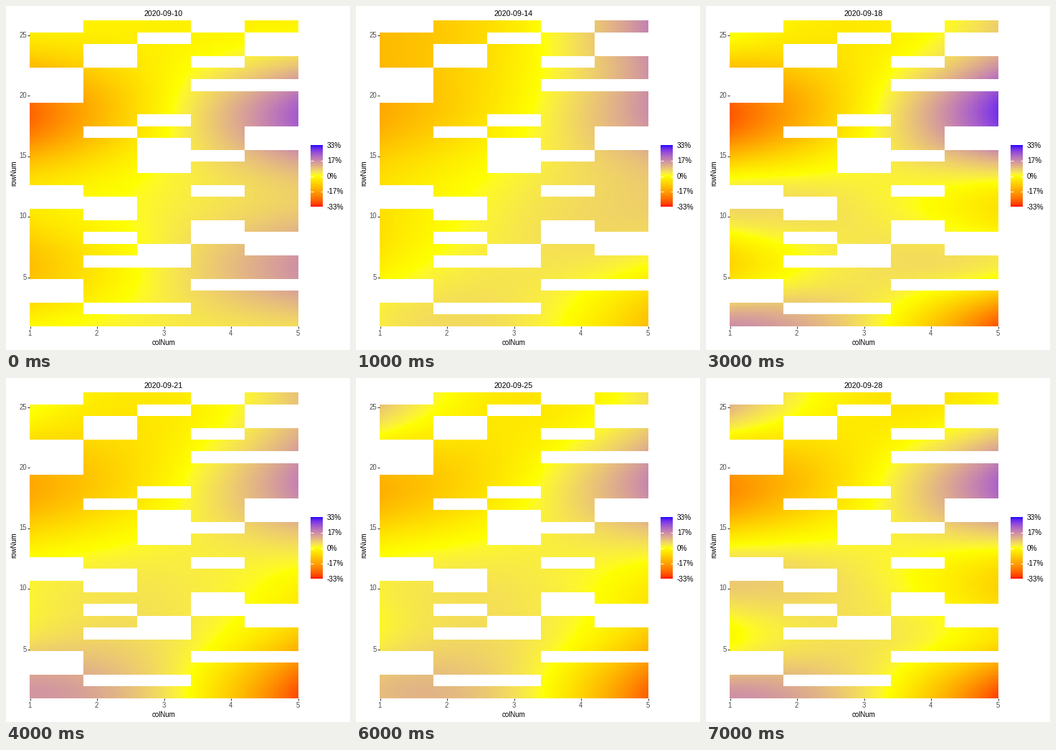
These frames come from a looping animation (480 px wide and 480 px high, 8000 ms). A matplotlib script:

```python
import numpy as np
import matplotlib
import matplotlib.pyplot as plt
from matplotlib.animation import FuncAnimation

matplotlib.rcParams["font.family"] = "Liberation Sans"

SIZE, DPI = 480, 72
LEFT, RIGHT, TOP, BOTTOM = 33, 407.6, 20.35, 446.52
ROWS, COLS = 26, 5
TILES_X, TILES_Y = 20, 5  # tiles per cell
LIMIT = 33

# Left-to-right tilt at these heights, then how strongly the sides bend.
HEIGHTS = np.array([1, 5.5, 10, 18.5, 26])
SHAPES = {
    "09-10": (3, 13.5, 6.5, 24.5, 0, 0.05),
    "09-14": (-7, 0.5, 6, 15.5, 14.5, 0.6),
    "09-18": (-22, 4, -4.5, 28, 2, 0.75),
    "09-21": (-22, -8.5, -2, 16.5, 3, 0.85),
    "09-25": (-18, -7, -3, 15.5, -3, 1),
    "09-28": (-23, -3, -7.5, 21, -7, 0.85),
}
SHAPES = {day: np.array(shape) for day, shape in SHAPES.items()}
for day, before, after in [("09-16", "09-14", "09-18"),
                           ("09-23", "09-21", "09-25")]:
    SHAPES[day] = (SHAPES[before] + SHAPES[after]) / 2
DAYS = sorted(SHAPES)

# Empty cells: for each column, the rows counted from the top.
GAPS = [
    (0, 4, 5, 6, 14, 15, 22, 23),
    (2, 3, 9, 15, 16, 18, 20, 24),
    (1, 8, 10, 11, 12, 19, 20, 24),
    (0, 3, 5, 11, 14, 17, 18, 22),
    (1, 2, 5, 9, 10, 18, 19, 22),
]
empty = np.zeros((ROWS, COLS), bool)
for col, rows in enumerate(GAPS):
    empty[list(rows), col] = True
empty = np.kron(empty, np.ones((TILES_Y, TILES_X))).astype(bool)


def centres(start, end, count):
    return start + (np.arange(count) + 0.5) / count * (end - start)


def bells(points):
    return np.exp(-((points[:, None] - HEIGHTS) / 4.5) ** 2)


side = (centres(1, 5, COLS * TILES_X) - 3) / 2
height = centres(26.2, 1, ROWS * TILES_Y)[:, None]
tilt_weights = bells(height[:, 0]) @ np.linalg.inv(bells(HEIGHTS))


def surface(shape):
    """Percent change of every tile."""
    bend = shape[-1]
    tilt = tilt_weights @ shape[:-1]
    middle = -(2.5 + 2 * bend) * np.tanh((height - 15.5) / 5)
    return middle + tilt[:, None] * side + bend * (height - 14.5) * side ** 2


# Red, yellow and blue in CIE Lab.
RED = np.array([53.24, 80.09, 67.20])
YELLOW = np.array([97.14, -21.55, 94.48])
BLUE = np.array([32.30, 79.19, -107.86])
XYZ_TO_RGB = np.array([[3.2406, -1.5372, -0.4986],
                       [-0.9689, 1.8758, 0.0415],
                       [0.0557, -0.2040, 1.0570]])


def colours(values):
    t = np.clip(values / LIMIT, -1, 1)[..., None]
    lab = YELLOW + np.abs(t) * (np.where(t < 0, RED, BLUE) - YELLOW)
    fy = (lab[..., 0] + 16) / 116
    f = np.stack([fy + lab[..., 1] / 500, fy, fy - lab[..., 2] / 200], -1)
    xyz = np.where(f > 6 / 29, f ** 3, (f - 4 / 29) * 108 / 841)
    rgb = np.clip(xyz * [0.9505, 1, 1.089] @ XYZ_TO_RGB.T, 0, 1)
    return np.where(rgb > 0.0031308,
                    1.055 * rgb ** (1 / 2.4) - 0.055, 12.92 * rgb)


def tile_index(start, end, count):
    """Pixels covered by a span and the tile under each of them."""
    pixels = np.arange(round(start), round(end))
    index = (pixels + 0.5 - start) / (end - start) * count
    return pixels, np.clip(index.astype(int), 0, count - 1)


px, tile_x = tile_index(LEFT, RIGHT, COLS * TILES_X)
py, tile_y = tile_index(TOP, BOTTOM, ROWS * TILES_Y)


def stage(day):
    tiles = colours(surface(SHAPES[day]))
    tiles[empty] = 1
    image = np.ones((SIZE, SIZE, 3))
    image[np.ix_(py, px)] = tiles[np.ix_(tile_y, tile_x)]
    image[194:280, 425:442] = colours(centres(LIMIT, -LIMIT, 86))[:, None]
    return image


fig = plt.figure(figsize=(SIZE / DPI, SIZE / DPI), dpi=DPI, facecolor="white")
ax = fig.add_axes([0, 0, 1, 1])
ax.axis("off")


def label(x, y, text, size, **kw):
    kw = {"ha": "center", "va": "center", "color": "black", **kw}
    return ax.text(x, y, text, fontsize=size, **kw)


def line(xs, ys, colour="#333333"):
    ax.plot(xs, ys, color=colour, lw=1, solid_capstyle="butt")


field = ax.imshow(stage(DAYS[0]), extent=(0, SIZE, SIZE, 0), aspect="auto",
                  interpolation="nearest")
title = label(220, 10.5, "2020-" + DAYS[0], 10.6)

for n in range(1, COLS + 1):
    x = int(33.5 + (n - 1) * 93.4) + 0.5
    line([x, x], [447, 450])
    label(x - 0.5, 457, str(n), 9.5, color="#4D4D4D")
for n in range(5, ROWS, 5):
    y = int(462.5 - n * 16.9) + 0.5
    line([30, 33], [y, y])
    label(29, y, str(n), 9.5, ha="right", color="#4D4D4D")
label(220.5, 470, "colNum", 9.8)
label(11.5, 233.5, "rowNum", 9.6, rotation=90)

for i in range(5):
    y = int(194 + i * 21.5) + 0.5
    if 0 < i < 4:
        line([425, 428.5], [y, y], "white")
        line([438.5, 442], [y, y], "white")
    percent = int(np.sign(2 - i) * np.ceil(abs(2 - i) * LIMIT / 2))
    label(448, y + 0.5, f"{percent}%", 10, ha="left")

ax.set_xlim(0, SIZE)
ax.set_ylim(SIZE, 0)


def draw(i):
    field.set_data(stage(DAYS[i]))
    title.set_text("2020-" + DAYS[i])
    return field, title


anim = FuncAnimation(fig, draw, frames=len(DAYS), interval=1000, repeat=True,
                     repeat_delay=0)
plt.show()
```
